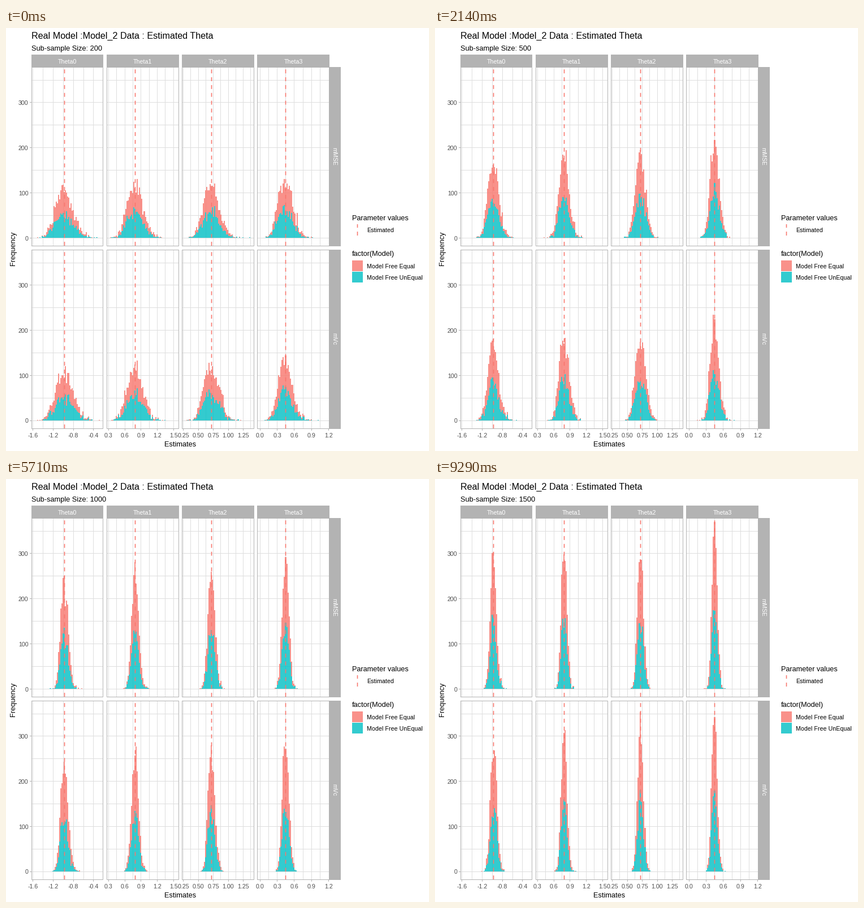
A matplotlib script that plays this animation: 748x748 px, repeating every 10000 ms.

```python
import numpy as np
import matplotlib.pyplot as plt
from matplotlib.animation import FuncAnimation
from matplotlib.patches import Polygon, Rectangle

plt.rcParams["font.family"] = "Liberation Sans"

SIZE = 748
STEPS, FRAMES, LOOP = 14, 100, 10000
GREY, GRID, DARK = "#B3B3B3", "#DEDEDE", "#4D4D4D"
SALMON, TEAL = "#F8766D", "#00BFC4"
BIG, MID, SMALL = 16.1, 12.8, 10.6

LEFT, WIDTH, PITCH = 45, 126.8, 133.2
TOP, HEIGHT, ROW_PITCH = 69, 316, 323
PX_PER_COUNT = 0.797
BIN = 2.05

# first label x, label spacing, estimate x, spread, first value, value step, decimals
COLS = [
    (47.5, 35.8, 103.5, 15.4, -1.6, 0.4, 1),
    (181.5, 28.7, 228.5, 14.0, 0.3, 0.3, 1),
    (313.5, 26.5, 363.5, 13.8, 0.25, 0.25, 2),
    (449.5, 30.2, 494.5, 12.8, 0.0, 0.3, 1),
]
ROWS = ["mMSE", "mVc"]

fig = plt.figure(figsize=(SIZE / 72, SIZE / 72), dpi=72, facecolor="white")
ax = fig.add_axes([0, 0, 1, 1])
ax.set_xlim(0, SIZE)
ax.set_ylim(SIZE, 0)
ax.axis("off")


def text(x, y, s, size, color="black", ha="left", **kw):
    return ax.text(x, y, s, fontsize=size, color=color, ha=ha,
                   va=kw.pop("va", "baseline"), **kw)


def mid(v):
    """Centre of the pixel that holds v."""
    return np.floor(v) + 0.5


def lines(segments, color, z):
    """Draw many one-pixel segments (x0, y0, x1, y1) as one artist."""
    xs, ys = [], []
    for x0, y0, x1, y1 in segments:
        xs += [x0, x1, np.nan]
        ys += [y0, y1, np.nan]
    ax.plot(xs, ys, color=color, lw=1, zorder=z, snap=False,
            solid_capstyle="butt")


def dashed(x, bottom, top):
    ax.plot([x, x], [bottom, top], color=SALMON, lw=1.6, zorder=5, snap=False,
            dashes=(4.33, 4.33), dash_capstyle="butt")


def box(x, y, w, h, color, **kw):
    ax.add_patch(Rectangle((x, y), w, h, fc=color, lw=0, antialiased=False, **kw))


def area(color):
    patch = Polygon([(0, 0), (0, 0), (0, 0)], fc=color, lw=0, alpha=0.8,
                    antialiased=False, zorder=3)
    ax.add_patch(patch)
    return patch


def col_left(c):
    return LEFT + PITCH * c


def row_top(r):
    return TOP + ROW_PITCH * r


def zero_line(r):
    return row_top(r) + HEIGHT - 14


areas = {}
grid, ticks = [], []
for r, name in enumerate(ROWS):
    top, zero = row_top(r), zero_line(r)
    bottom = top + HEIGHT
    for c, (first, step, estimate, *_) in enumerate(COLS):
        left, right = col_left(c), col_left(c) + WIDTH
        grid += [(mid(x), top, mid(x), bottom)
                 for x in np.arange(first, right - 2, step / 2)]
        grid += [(left, mid(y), right, mid(y))
                 for y in zero - 50 * PX_PER_COUNT * np.arange(8)]
        dashed(estimate, bottom, top)
        ax.add_patch(Rectangle((mid(left), top + 0.5), mid(right) - mid(left),
                               HEIGHT, fill=False, ec=GREY, lw=1, zorder=6,
                               snap=False))
        areas[r, c] = area(SALMON), area(TEAL)
    for v in range(0, 301, 100):
        y = zero - v * PX_PER_COUNT
        ticks.append((42, mid(y), 45, mid(y)))
        text(39.5, y + 4.5, str(v), SMALL, DARK, "right")
    box(571, top, 21, HEIGHT + 1, GREY)
    text(580, top + HEIGHT / 2, name, SMALL, "white", "center",
         va="center", rotation=-90)

for c, (first, step, _, _, value, inc, digits) in enumerate(COLS):
    left, right = col_left(c), col_left(c) + WIDTH
    box(np.floor(left), 47, np.floor(right) - np.floor(left) + 1, 22, GREY)
    text((left + right) / 2, 63, f"Theta{c}", SMALL, "white", "center")
    for k, x in enumerate(np.arange(first, right, step)):
        ticks.append((mid(x), 708, mid(x), 712))
        text(x, 723.5, f"{value + k * inc:.{digits}f}", SMALL, DARK, "center")

lines(grid, GRID, 1)
lines(ticks, GREY, 6)

text(45, 19, "Real Model :Model_2 Data : Estimated Theta", BIG)
subtitle = text(45, 39.5, "", MID)
text(308, 740, "Estimates", MID, ha="center")
text(13.5, 389.5, "Frequency", MID, ha="center", va="center", rotation=90)

text(612, 339.5, "Parameter values", MID)
dashed(621.5, 367, 347)
text(638, 361, "Estimated", SMALL)
text(612, 403, "factor(Model)", MID)
for y, color, label in ((411, SALMON, "Model Free Equal"),
                        (431, TEAL, "Model Free UnEqual")):
    box(612, y, 19, 19, color, alpha=0.8)
    text(638, y + 14, label, SMALL)


def stacked_counts(r, c, size):
    """Bin edges, lower counts and stacked totals for one panel."""
    _, _, estimate, spread, *_ = COLS[c]
    rng = np.random.default_rng(1000 * r + 100 * c + size)
    shrink = np.sqrt(200 / size)
    z = rng.standard_normal((2, 1000))
    z += 0.04 * shrink * (z ** 2 - 1)
    edges = col_left(c) + 5.8 + BIN * np.arange(57)
    low, high = (np.histogram(estimate + spread * shrink * row, edges)[0]
                 for row in z)
    return edges, low, low + high


def band(edges, lower, upper):
    x = np.repeat(np.round(edges), 2)[1:-1]
    lo, up = np.repeat(lower, 2), np.repeat(upper, 2)
    return np.column_stack([np.r_[x, x[::-1]], np.r_[up, lo[::-1]]])


def update(i):
    # a step shows from the frame in which it begins
    step = ((i + 1) * STEPS - 1) // FRAMES
    size = 200 + 100 * step
    subtitle.set_text(f"Sub-sample Size: {size}")
    for (r, c), (upper, lower) in areas.items():
        edges, low, total = stacked_counts(r, c, size)
        zero = zero_line(r)
        y_low = np.round(zero - low * PX_PER_COUNT)
        y_top = np.round(zero - total * PX_PER_COUNT)
        lower.set_xy(band(edges, np.full(len(low), zero), y_low))
        upper.set_xy(band(edges, y_low, y_top))
    return [subtitle]


anim = FuncAnimation(fig, update, frames=FRAMES, interval=LOOP // FRAMES,
                     repeat=True, repeat_delay=0, blit=False)
plt.show()
```
